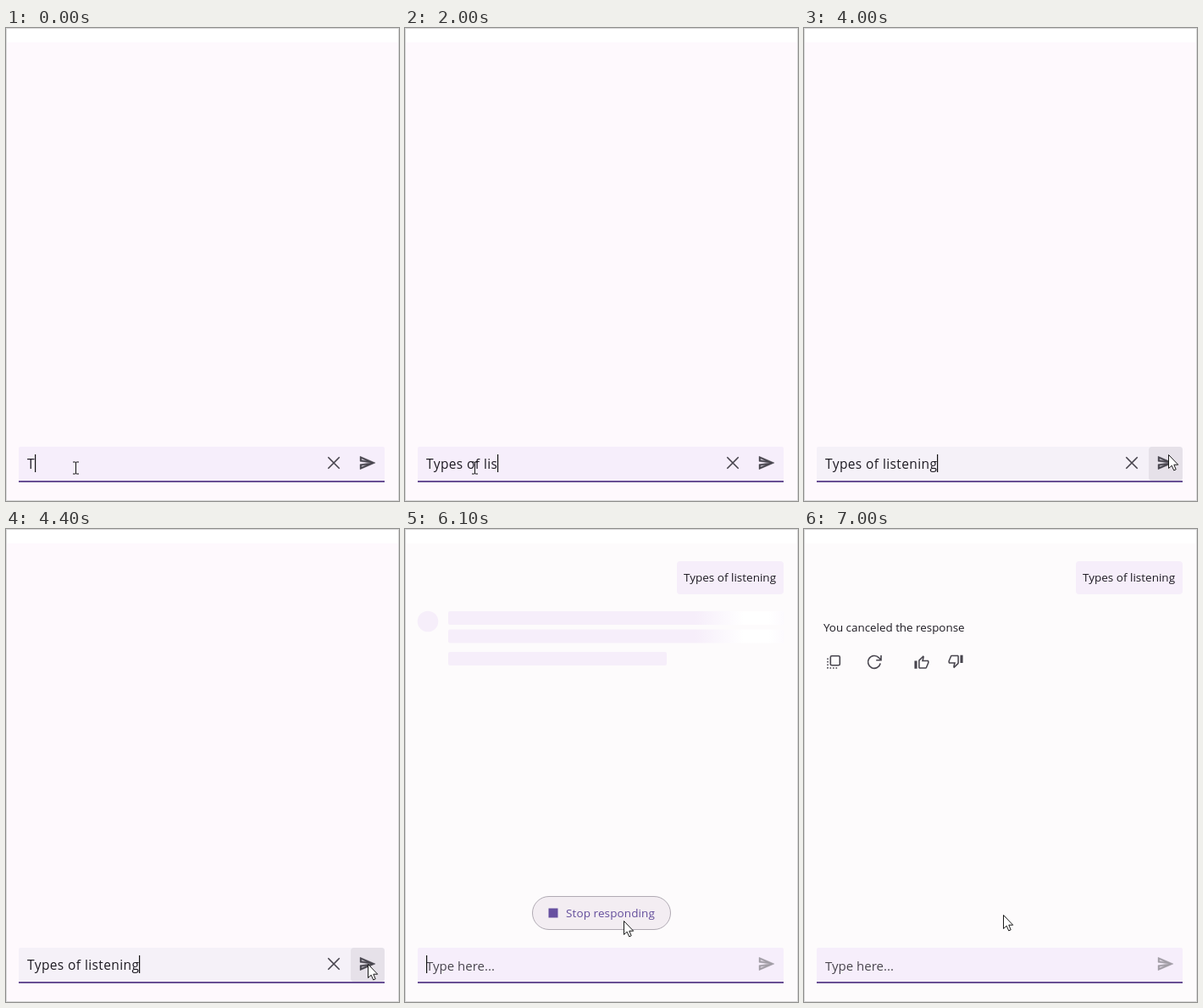
Write an HTML page that moves like this. It is 464x558 px and loops after 7.3 s.

```html
<!DOCTYPE html>
<html lang="en">
<head>
<meta charset="utf-8">
<title>Chat prompt</title>
<style>
  html, body { margin: 0; height: 100%; overflow: hidden; background: #fff; }
  svg { display: block; width: 464px; height: 558px; }
  text { font: 13.5px "Open Sans", "Noto Sans", sans-serif; fill: #1d1a22; white-space: pre; }
  #typed { font-size: 15.5px; letter-spacing: .4px; }
  #hint { font-size: 15px; fill: #49454e; }
  #stop text { fill: #634d9b; letter-spacing: .1px; }
  .line { fill: none; stroke: #48454e; stroke-width: 1.6; }
</style>
</head>
<body>
<svg viewBox="0 0 464 558">
  <defs>
    <linearGradient id="wave" gradientUnits="userSpaceOnUse" x1="-72" x2="72" y1="0" y2="0">
      <stop offset="0" stop-color="#f6eefa"/>
      <stop offset=".4" stop-color="#fff"/>
      <stop offset=".6" stop-color="#fff"/>
      <stop offset="1" stop-color="#f6eefa"/>
    </linearGradient>
    <radialGradient id="ink">
      <stop offset="0" stop-color="#c6c3c9"/>
      <stop offset=".6" stop-color="#cecbd1"/>
      <stop offset="1" stop-color="#dbd6de"/>
    </radialGradient>
    <clipPath id="pill"><rect x="150.5" y="433.5" width="163" height="39" rx="19.5"/></clipPath>
    <path id="thumb" d="M9 21h9c.83 0 1.54-.5 1.84-1.22l3.02-7.05c.09-.23.14-.47.14-.73v-2c0-1.1-.9-2-2-2h-6.31l.95-4.57.03-.32c0-.41-.17-.79-.44-1.06L14.17 1 7.58 7.59C7.22 7.95 7 8.45 7 9v10c0 1.1.9 2 2 2zM9 9l4.34-4.34L12 10h9v2l-3 7H9V9zM1 9h4v12H1z" transform="scale(.78) translate(-12 -11)" fill="#48454e"/>
  </defs>

  <rect id="page" y="17" width="464" height="541"/>
  <rect x=".5" y=".5" width="463" height="557" fill="none" stroke="#d9d8d9"/>

  <g id="bubble">
    <rect x="321" y="38" width="126" height="39" rx="4" fill="#f6eefa"/>
    <text x="329" y="62">Types of listening</text>
  </g>

  <g id="shimmer" fill="url(#wave)">
    <circle cx="27" cy="109" r="12.3"/>
    <rect x="51" y="97" width="396" height="16" rx="2"/>
    <rect x="51" y="118.500" width="396" height="16" rx="2"/>
    <rect x="51" y="145" width="258" height="16" rx="2"/>
  </g>

  <g id="reply">
    <text x="23" y="121" style="font-size:13.4px">You canceled the response</text>
    <rect class="line" x="31.300" y="149.700" width="11" height="11" rx="1.500"/>
    <path class="line" d="M28 152.500V164H40" stroke-dasharray="1.6 1.9"/>
    <path class="line" d="M90.200 158.500A7.400 7.400 0 1 1 88.500 152L91 154.500M91 149V154.800H85.200"/>
    <use href="#thumb" x="0" y="0" transform="translate(139 157)"/>
    <use href="#thumb" transform="translate(179 156.500) rotate(180)"/>
  </g>

  <g id="stop">
    <rect id="face" x="150.500" y="433.500" width="163" height="39" rx="19.500"/>
    <g clip-path="url(#pill)"><circle id="ripple" cx="235" cy="455" fill="url(#ink)"/></g>
    <rect x="150.500" y="433.500" width="163" height="39" rx="19.500" fill="none" stroke="#b0aab3"/>
    <rect x="169.500" y="447.500" width="11" height="11" fill="#6750a0"/>
    <text x="190" y="458">Stop responding</text>
  </g>

  <rect id="field" x="15" y="494" width="432" height="41" rx="2"/>
  <rect id="press" x="407" y="494" width="40" height="40" rx="4"/>
  <rect x="15" y="534" width="432" height="2" fill="#684f94"/>
  <text id="typed" x="25" y="520"></text>
  <text id="hint" x="25" y="521">Type here...</text>
  <rect id="caret" y="503" width="1.200" height="21" fill="#111"/>
  <path id="clear" class="line" d="M380.300 506.300l13.400 13.400m0-13.400l-13.400 13.400"/>
  <path id="send" stroke-width=".5" transform="translate(416.300 502.700) scale(.857)" d="M4.010 6.030l7.510 3.220-7.520-1 .01-2.220m7.500 8.720L4 17.970v-2.220l7.510-1M2.010 3L2 10l15 2-15 2 .01 7L23 12 2.010 3z"/>

  <path id="beam" fill="none" stroke="#111" d="M-3.500 -7H-1Q0 -7 0 -6Q0 -7 1 -7H3.500M0 -6V6M-3.500 7H-1Q0 7 0 6Q0 7 1 7H3.500"/>
  <path id="arrow" fill="#fff" stroke="#1a1a1a" d="M.5 .5V16.500L4.200 13.200L6.700 18.900L9.200 17.800L6.800 12.200H11.700Z"/>
</svg>
<script>
const LOOP = 7300, SENT = 5400, DONE = 6900;
const prompt = "Types of listening";
const keyTimes = [0, 100, 400, 600, 800, 900, 1100, 1400, 1500, 1700, 1900, 2000, 2200, 2300, 2500, 2700, 2900, 3100];
const pointer = [
  [3600, 82.5, 519], [3800, 230, 512], [3900, 370, 505], [4000, 430, 503], [4100, 432, 505],
  [4400, 427, 513], [5400, 427, 513], [5700, 370, 494], [6100, 258, 462], [6300, 235, 455]
];
const $ = id => document.getElementById(id);
const show = (id, on) => $(id).setAttribute("visibility", on ? "visible" : "hidden");
const fill = (id, color) => $(id).setAttribute("fill", color);
const move = (id, x, y) => $(id).setAttribute("transform", `translate(${x} ${y})`);

function pointerAt(t) {
  const i = pointer.findIndex(p => p[0] > t);
  if (i === 0) return pointer[0].slice(1);
  if (i < 0) return pointer.at(-1).slice(1);
  const [a, b] = [pointer[i - 1], pointer[i]];
  const k = (t - a[0]) / (b[0] - a[0]);
  return [1, 2].map(n => Math.round(a[n] + (b[n] - a[n]) * k));
}

function draw(t) {
  const sent = t >= SENT, waiting = t >= 5500 && t < DONE;
  const pressed = t >= 4700;

  fill("page", pressed ? "#fdfbfc" : "#fef9fd");
  fill("field", t >= 3900 && !sent ? "#f5f1f8" : "#f6eefb");
  show("press", t >= 3900 && !sent);
  fill("press", pressed ? "#d4cddd" : "#e6e1e9");

  const text = sent ? "" : prompt.slice(0, keyTimes.filter(k => k <= t).length);
  $("typed").textContent = text;
  const width = text ? $("typed").getComputedTextLength() : 0;
  $("caret").setAttribute("x", Math.round(25 + width));
  show("caret", t < 7000 && !(t >= 4700 && t < 5200));
  show("hint", sent);
  show("clear", !sent);
  fill("send", sent ? "#a19da5" : "#48454e");
  $("send").setAttribute("stroke", sent ? "#a19da5" : "#48454e");

  show("bubble", sent);
  show("shimmer", waiting);
  $("wave").setAttribute("gradientTransform", `translate(${((t + 688) % 1000) * .69 - 129})`);
  show("reply", t >= DONE);

  const held = t >= 6600;
  show("stop", waiting);
  fill("face", held ? "#e7e1ea" : t >= 5900 ? "#f3edf2" : "#fdfbfc");
  $("ripple").setAttribute("r", held ? 52 + (t - 6600) * .2 : 0);

  const [x, y] = pointerAt(t), overText = t < 3900;
  move("beam", x, y);
  move("arrow", x, y);
  show("beam", overText);
  show("arrow", !overText);
}

function tick() {
  draw(Math.floor(performance.now() % LOOP / 100) * 100);
  requestAnimationFrame(tick);
}
tick();
</script>
</body>
</html>
```
